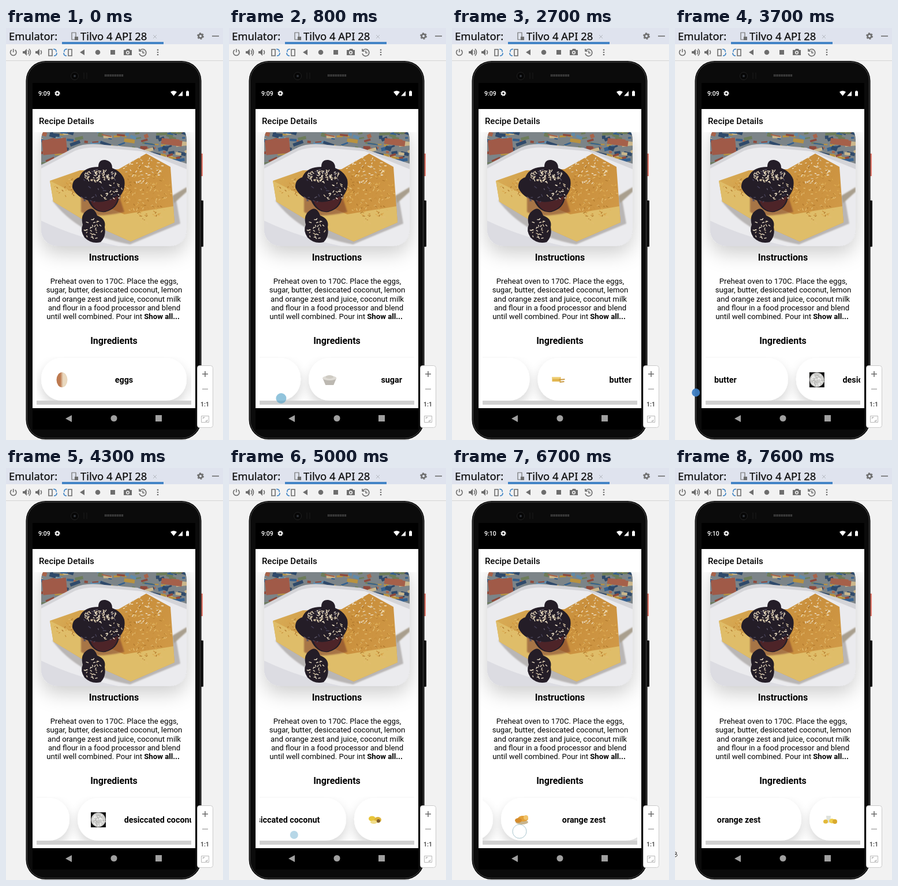
Write an HTML page that moves like this. It is 376 px wide and 712 px high and loops after 7.7 s.

```html
<!DOCTYPE html>
<html lang="en">
<head>
<meta charset="utf-8">
<title>Recipe app in an emulator</title>
<style>
html, body { margin: 0; width: 100%; height: 100%; overflow: hidden; background: #f2f2f2 }
svg { display: block; width: 376px; height: 712px }
text { font-family: Roboto, sans-serif; fill: #000 }
.ui { font: 18.4px "Noto Sans", sans-serif; fill: #0c0c0c; stroke: #0c0c0c; stroke-width: .25 }
.mid { text-anchor: middle }
.body { font-size: 13.2px }
.head { font-size: 16px; font-weight: 700 }
.item { font-size: 14.3px; font-weight: 700 }
.tool { fill: none; stroke: #6e6e6e; stroke-width: 1.6 }
.solid { fill: #6e6e6e; stroke: none }
.blue { stroke: #3b82c4 }
</style>
</head>
<body>
<svg viewBox="0 0 376 712">
  <defs>
    <clipPath id="screen"><rect x="46" y="180" width="282" height="477"/></clipPath>
    <clipPath id="photo"><rect x="61" y="165" width="252" height="212" rx="28"/></clipPath>
    <clipPath id="list"><rect x="53" y="568" width="268" height="83"/></clipPath>
    <filter id="soft" x="-30%" y="-30%" width="160%" height="180%">
      <feDropShadow dx="0" dy="12" stdDeviation="17" flood-opacity=".2"/>
    </filter>
    <filter id="lift" x="-20%" y="-50%" width="140%" height="220%">
      <feDropShadow dx="0" dy="9" stdDeviation="9" flood-opacity=".16"/>
    </filter>
    <filter id="blur"><feGaussianBlur stdDeviation="1"/></filter>
    <linearGradient id="crust" x1="0" y1=".2" x2="1" y2=".7">
      <stop offset="0" stop-color="#d9ae58"/><stop offset=".55" stop-color="#c98f3c"/><stop offset="1" stop-color="#d19a48"/>
    </linearGradient>
    <linearGradient id="shell"><stop offset=".35" stop-color="#bd7a50"/><stop offset=".6" stop-color="#ead9bf"/></linearGradient>
  </defs>

  <!-- window bars -->
  <rect width="376" height="712" fill="#f2f2f2"/>
  <rect width="376" height="28" fill="#dfe3ee"/>
  <rect y="56" width="376" height="1" fill="#d4d4d4"/>
  <rect x="97" y="24" width="176" height="4" fill="#4384c6"/>
  <text class="ui" x="5" y="21">Emulator:</text>
  <text class="ui" x="129" y="21">Tilvo 4 API 28</text>
  <g class="tool">
    <path d="M114 8h7v12h-7z" stroke-width="1.2"/>
    <path class="solid" d="M119 15h6v6h-6z"/>
    <path d="M255 12l6 6m0-6l-6 6" stroke="#b4b8c0" stroke-width="1"/>
    <circle cx="337" cy="14" r="3.4" stroke-width="2.6"/>
    <circle cx="337" cy="14" r="5.2" stroke-dasharray="2.72 2.72"/>
    <path d="M357 14h12"/>
    <path d="M9.7 38a5.2 5.2 0 1 0 6 0M12.7 36v6"/>
    <path class="solid" d="M29 40h3l4-4v12l-4-4h-3zM51 40h3l4-4v12l-4-4h-3z"/>
    <path d="M38 38.5q3 3.500 0 7M40 36q5 6 0 12M60 38.500q3 3.500 0 7"/>
    <path d="M74 37h6v11h-6zM108 37h6v11h-6z"/>
    <path class="blue" d="M82 36.5q6 0 5 5M88 43q0 5-5 5M106 36.5q-6 0-5 5M100 43q0 5 5 5"/>
    <path class="solid" d="M128 42l8-5v10zM181 38h8v8h-8zM204 38h4l1-2h5l1 2h3v9h-14z"/>
    <circle class="solid" cx="159" cy="42" r="4.300"/>
    <circle cx="211" cy="42.500" r="2.300" stroke="#f2f2f2"/>
    <path d="M232 39a6 6 0 1 1-1 5M231 36v4h4M237 39v4h3"/>
    <path d="M263 36.700v2.200m0 2v2.200m0 2v2.200" stroke-width="2.400"/>
  </g>

  <!-- phone -->
  <rect x="337" y="217" width="4" height="39" fill="#e07b6e"/>
  <rect x="337" y="298" width="5" height="80" rx="1" fill="#151515"/>
  <rect x="34.500" y="57" width="304" height="654" rx="34" fill="#050505"/>
  <rect x="36.500" y="59" width="300" height="650" rx="32" fill="#0b0b0b" stroke="#5e5e5e" stroke-width=".8"/>
  <circle cx="119" cy="83" r="6.500" fill="#060606" stroke="#222"/>
  <circle cx="119" cy="83" r="2" fill="#30343a"/>
  <path d="M135 77v11m5-11v11" stroke="#1d1d1d"/>
  <path d="M171 82h32" stroke="#444" stroke-width="4" stroke-dasharray="2 1"/>
  <path d="M46 95h282v599H46z"/>
  <path d="M46 140h282v517H46z" fill="#fff"/>
  <text id="clock" x="56" y="117" style="font-size:10.5px;font-weight:500;fill:#fff"></text>
  <g fill="none" stroke="#fff">
    <circle cx="89" cy="113" r="2.700" stroke-width="2"/>
    <circle cx="89" cy="113" r="4" stroke-width="1.400" stroke-dasharray="1.570 1.570"/>
  </g>
  <path d="M285 110.500q5.500-4 11 0l-5.500 7zM298 117.500h8v-8.500zM312 109.500h1v-1h3v1h1v8h-5z" fill="#fff"/>
  <g fill="#a0a0a0"><path d="M103 675l11-6v12zM259 669h11v11h-11z"/><circle cx="187" cy="674.500" r="5.500"/></g>

  <!-- recipe page -->
  <g clip-path="url(#screen)">
    <rect x="61" y="165" width="252" height="212" rx="28" fill="#e4e4e8" filter="url(#soft)"/>
    <g clip-path="url(#photo)">
      <g id="cloth"></g>
      <path d="M55 240L118 207Q135 199 160 201L228 207 318 236V380H55z" fill="#d4d4d8"/>
      <path d="M55 246L120 212Q140 205 165 207L236 213 318 246V380H55z" fill="#ebebee"/>
      <path d="M55 330Q120 362 200 378H55z" fill="#dcdce2"/>
      <g filter="url(#blur)">
        <path d="M80 298Q125 358 215 374L302 338 294 292z" fill="#b9b6b5"/>
        <path d="M288 290l25-15v8l-22 20z" fill="#a99f8e"/>
      </g>
      <path d="M76 264L128 246 195 244 243 217 285 240 292 336 216 369 140 335 82 300z" fill="url(#crust)"/>
      <path d="M76 264L120 286 205 322 290 308 292 336 216 369 140 335 82 300z" fill="#dfbd69"/>
      <g id="crumbs"></g>
      <path d="M130 318Q150 330 205 318L196 290H130z" fill="#7a3b2c" opacity=".55" filter="url(#blur)"/>
      <g fill="#241d27">
        <path d="M160 240Q160 227 172 228 184 230 184 242 200 248 205 262 208 280 196 292 194 312 172 318 152 320 142 298 122 292 115 276 114 262 127 258 134 240 160 240z"/>
        <path d="M142 314Q152 308 158 324 174 330 171 344 174 360 164 370 148 374 136 362 128 350 133 340 128 322 142 314z"/>
      </g>
      <path d="M146 298Q168 306 194 290 192 312 170 317 154 318 146 298z" fill="#4d2428"/>
      <g id="flakes"></g>
    </g>
  </g>
  <text x="57" y="165.500" style="font-size:15px;font-weight:500">Recipe Details</text>
  <g class="mid">
    <text class="head" x="187" y="402">Instructions</text>
    <g id="steps"></g>
    <text class="head" x="187" y="546">Ingredients</text>
  </g>
  <g clip-path="url(#list)">
    <g id="cards"></g>
    <path d="M53 644h268v7H53z" fill="#d0d0d0"/>
  </g>

  <!-- zoom panel -->
  <rect x="331.500" y="583.500" width="27" height="107" rx="4" fill="#fff" stroke="#cbcbcb"/>
  <g class="tool">
    <path d="M340 598h10m-5-5v10"/><path d="M340 624h10" stroke="#b0b0b0"/>
    <path d="M338.500 670.500h13v11h-13z" stroke="#b8b8b8" stroke-width="1"/>
    <path d="M341.500 675v-2h3m4 4v2.500h-3" stroke="#999" stroke-width="1"/>
  </g>
  <text class="mid" x="344.500" y="654" style="font-size:10.5px;font-weight:700;fill:#555">1:1</text>

  <circle id="touch"/>
  <path id="pointer" d="M0 664q3-1 3 2-3 1-3 2 4-1 4 1-1 3-4 3" fill="#fff" stroke="#333"/>
</svg>
<script>
const $ = id => document.getElementById(id);
const set = (el, attrs) => { for (const k in attrs) el.setAttribute(k, attrs[k]); };
let seed = 7;
const rnd = (a, b) => {
  seed = seed * 16807 % 2147483647;
  return a + (b - a) * seed / 2147483647;
};
const pick = list => list[Math.floor(rnd(0, list.length))];
const many = (n, make) => Array.from({ length: n }, make).join('');

// Photo textures
const patch = (x, y, w, h, fill, turn) =>
  `<rect x="${x}" y="${y}" width="${w}" height="${h}" fill="${fill}" transform="rotate(${turn} ${x} ${y})"/>`;
const dyes = ['#35618f', '#5f8bab', '#b9923f', '#8f4a3c', '#cbb78c', '#2f4a6b', '#6d7d5a', '#a8634a'];
$('cloth').innerHTML = patch(61, 165, 252, 90, '#7c8488', 0)
  + many(170, () => patch(rnd(55, 310), rnd(174, 245), rnd(5, 20), rnd(2, 7), pick(dyes), rnd(-25, 25)))
  + patch(62, 194, 42, 26, '#a05a48', -6) + patch(270, 190, 36, 10, '#a5604a', 8);
// Scattered slivers inside an ellipse
const scatter = (n, cx, cy, rx, ry, size, fills) => many(n, () => {
  const a = rnd(0, 6.283), d = Math.sqrt(rnd(0, 1));
  return patch(cx + rx * d * Math.cos(a), cy + ry * d * Math.sin(a), rnd(size / 2, size), 1.3, pick(fills), rnd(-70, 70));
});
const gold = ['#b0782c', '#e3bd70', '#c8903b', '#dca94f'], coconut = ['#f1e5cc', '#d8c6a5'];
$('crumbs').innerHTML = scatter(170, 243, 285, 42, 50, 5, gold) + scatter(50, 110, 275, 28, 15, 5, gold)
  + scatter(45, 235, 248, 38, 24, 5, coconut);
$('flakes').innerHTML = scatter(30, 163, 275, 40, 35, 6, ['#46425a', '#5d5768'])
  + scatter(75, 161, 255, 28, 11, 5, coconut) + scatter(22, 180, 281, 22, 16, 5, coconut)
  + scatter(28, 150, 346, 16, 18, 5, coconut);

// Page text
$('steps').innerHTML = [
  'Preheat oven to 170C. Place the eggs,',
  'sugar, butter, desiccated coconut, lemon',
  'and orange zest and juice, coconut milk',
  'and flour in a food processor and blend',
  'until well combined. Pour int <tspan font-weight="700">Show all...</tspan>'
].map((line, i) => `<text class="body" x="${i == 4 ? 185.5 : 187.5}" y="${442.3 + 15.14 * i}">${line}</text>`).join('');

// Ingredient cards; icons are drawn around their own centre
const blob = (x, y, rx, ry, fill) => `<ellipse cx="${x}" cy="${y}" rx="${rx}" ry="${ry}" fill="${fill}"/>`;
const items = [
  ['eggs', blob(0, 0, 9.5, 13, 'url(#shell)')],
  ['sugar', '<path d="M-12-3L-7 9H7L12-3z" fill="#bcb8b1"/>' + blob(0, -3, 12, 4, '#dedbd5') + blob(0, -5, 7, 3, '#cfcbc3')],
  ['butter', '<path d="M-11-5H4V3H-11z" fill="#e2b650"/><path d="M1 0L11-1M2 4L10 3" stroke="#c99a45" stroke-width="2"/><path d="M-11-5H4l-2 3H-11z" fill="#f0d27d"/>'],
  ['desiccated coconut', '<path d="M-13-13H13V13H-13z" fill="#111"/>' + blob(0, 0, 12.5, 12.5, '#cfcfcd') + scatter(50, 0, 0, 11, 11, 4, ['#f5f5f3', '#b5b5b2'])],
  ['lemon zest', blob(-5, -2, 6, 4.5, '#e8c53a') + blob(5, 0, 6, 5, '#dcb23a') + blob(-2, 4, 6, 3, '#f0dc8a') + blob(6, 2, 3, 3, '#7d5b2d')],
  ['orange zest', blob(0, 4, 11, 4, '#c8b48e') + blob(2, -2, 9, 5, '#e2a03a') + blob(-6, 1, 6, 4, '#d48c2c') + blob(7, -4, 4, 4, '#f1c36a')],
  ['lemon juice', '<path d="M-7-7H1L0 5H-6z" fill="#dfe2dc"/>' + blob(-8, 3, 4, 3.5, '#e3b93a') + blob(3, 2, 5, 4, '#efcf4b') + blob(8, 3, 4, 4, '#d9a92e')]
];
$('cards').innerHTML = items.map(([name, icon], i) => `<g transform="translate(${61 + 266 * i} 570)">
  <rect width="252" height="74" rx="36" fill="#fff" filter="url(#lift)"/>
  <g transform="translate(36 38)">${icon}</g>
  <text class="item mid" x="143.5" y="42.5">${name}</text></g>`).join('');

// Each swipe: press, release and rest times; scroll at those times; touch end x, y, radius, fill opacity
const swipes = [
  [0, 1000, 1600, 0, 236, 285, 30, 640, 9, .6],
  [1700, 2500, 3200, 285, 435, 450, 28, 636, 8, .6],
  [3250, 3720, 4300, 450, 658, 735, 23, 630, 7, .95],
  [4500, 5150, 5800, 735, 960, 1135, 47, 634, 7, .4],
  [5900, 6700, 7500, 1135, 1306, 1424, 117, 628, 12, 0]
];

function draw(t) {
  const [press, release, rest, s0, s1, s2, endX, y, r, fill] = swipes.findLast(s => t >= s[0]);
  const drag = Math.min(1, (t - press) / (release - press));
  const fling = Math.min(1, Math.max(0, (t - release) / (rest - release)));
  const scroll = s0 + (s1 - s0) * drag + (s2 - s1) * (1 - (1 - fling) ** 3);
  set($('cards'), { transform: `translate(${-scroll} 0)` });
  set($('touch'), {
    cx: 332 + (endX - 332) * drag, cy: y, r,
    fill: fill > .9 ? '#3f7fc4' : '#4a9cc4', 'fill-opacity': fill,
    stroke: fill ? 'none' : '#a9c6ce',
    visibility: t > press && t <= release ? 'visible' : 'hidden'
  });
  set($('pointer'), { visibility: t >= 7600 ? 'visible' : 'hidden' });
  $('clock').textContent = t < 5600 ? '9:09' : '9:10';
}

const start = performance.now();
function tick() {
  const t = (performance.now() - start) % 7700;
  draw(Math.floor(t / 100) * 100);
  requestAnimationFrame(tick);
}
tick();
</script>
</body>
</html>
```
